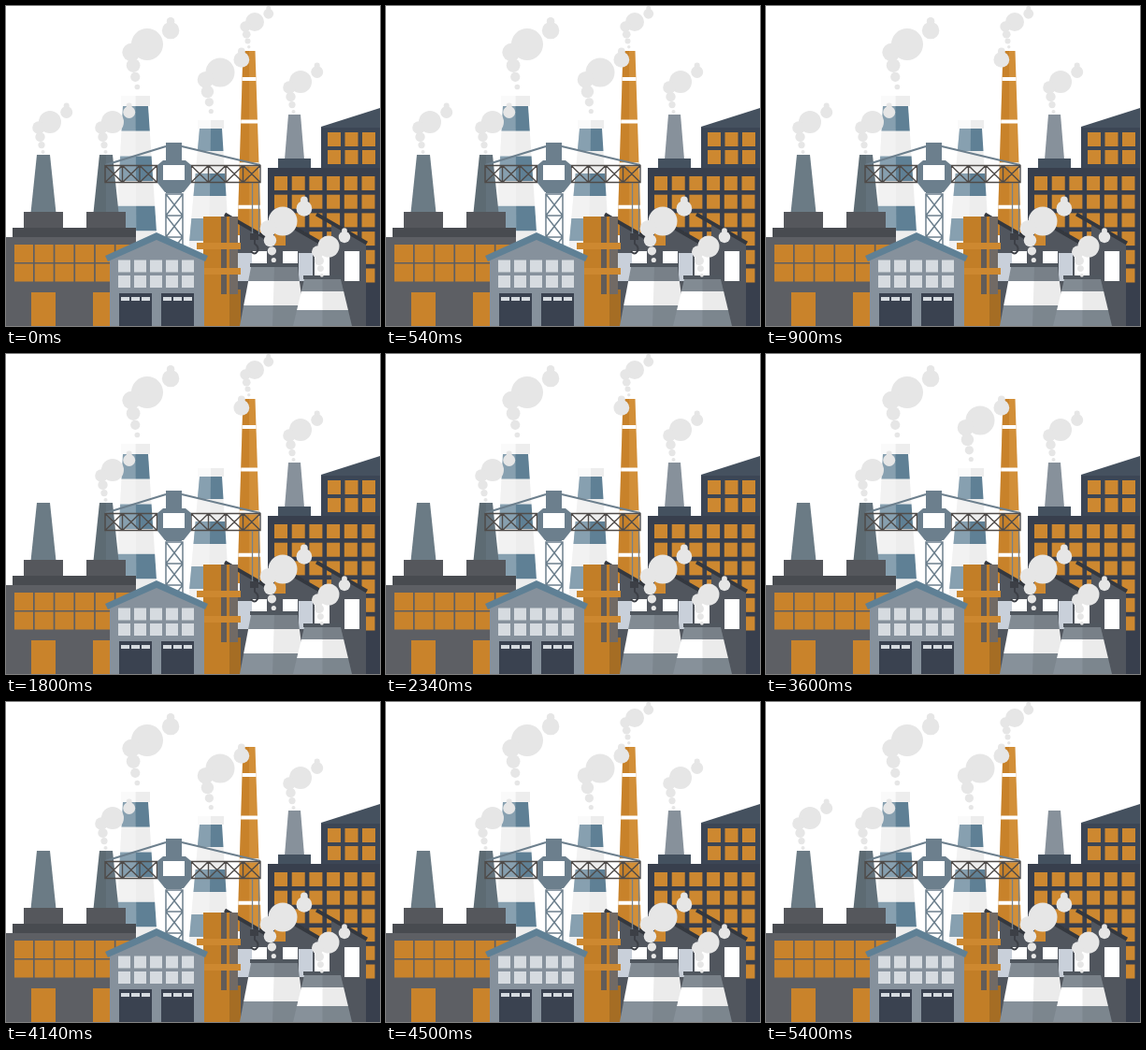
Write an HTML page that moves like this. It is 400 px wide and 342 px high and loops after 6.3 s.

```html
<!DOCTYPE html>
<html lang="en">
<head>
<meta charset="utf-8">
<title>Factory skyline</title>
<style>
html, body { margin: 0; width: 100%; height: 100%; overflow: hidden; background: #fff; }
svg { display: block; width: 100vw; height: 100vh; }
</style>
</head>
<body>
<svg id="stage" viewBox="0 0 400 342"></svg>
<script>
const stage = document.getElementById('stage');
const FLOOR = 342;
const ORANGE = '#cd8830', BLUE = '#5f8095', NAVY = '#383f4d', STEEL = '#6c7f8d', BEAM = '#4f4b49';
const WALL = '#51565e', DARK = '#34383f', PALE = '#d6dbe0';

function add(tag, attrs) {
  const el = document.createElementNS('http://www.w3.org/2000/svg', tag);
  for (const k in attrs) el.setAttribute(k, attrs[k]);
  stage.appendChild(el);
  return el;
}
// Rectangles are given by their edges.
const box = (x1, y1, x2, y2, fill) => add('rect', { x: x1, y: y1, width: x2 - x1, height: y2 - y1, fill });
const poly = (points, fill, opacity = 1) => add('polygon', { points, fill, opacity });
const line = (d, stroke, width) => add('path', { d, stroke, 'stroke-width': width, fill: 'none' });

// Rows of equal panes: first corner, counts, spacing, pane size.
function panes(x, y, cols, rows, dx, dy, w, h, fill) {
  for (let r = 0; r < rows; r++)
    for (let c = 0; c < cols; c++)
      box(x + c * dx, y + r * dy, x + c * dx + w, y + r * dy + h, fill);
}

// A tapered tower; band() paints a slice, half() tints one side.
function taper(y1, l1, r1, y2, l2, r2) {
  const mix = (a, b, y) => a + (b - a) * (y - y1) / (y2 - y1);
  const left = y => mix(l1, l2, y), right = y => mix(r1, r2, y);
  const mid = y => (left(y) + right(y)) / 2;
  const slice = (a, b, from, to, fill, opacity) =>
    poly(`${from(a)},${a} ${to(a)},${a} ${to(b)},${b} ${from(b)},${b}`, fill, opacity);
  return {
    band: (a, b, fill) => slice(a, b, left, right, fill),
    half: (side, fill, opacity) => side === 'left'
      ? slice(y1, y2, left, mid, fill, opacity)
      : slice(y1, y2, mid, right, fill, opacity)
  };
}

function rightBlocks() {
  taper(116, 302, 315, 164, 298, 319).band(116, 164, '#87919b');
  box(291, 163, 326, 175, '#44515f');
  poly('337,129 400,109 400,175 337,175', '#45515f');
  box(337, 130, 400, 175, '#3c4655');
  panes(344, 135, 3, 2, 18.5, 19, 14, 15, ORANGE);
  box(280, 173, 400, FLOOR, NAVY);
  panes(287, 182, 6, 6, 18.7, 19.7, 14, 15, ORANGE);
}

function stripedStack(top, bottom, step, cap) {
  const [y, l, r] = top, [yb, lb, rb] = bottom;
  const t = taper(y, l, r, yb, lb, rb);
  for (let i = 0, a = y; a < yb; i++, a += step)
    t.band(a, Math.min(a + step, yb), i % 2 ? '#ededed' : BLUE);
  t.half('left', '#fff', .25);
  const mid = (l + r) / 2;
  box(l - 2, cap, mid, y, '#fafafa');
  box(mid, cap, r + 2, y, '#ededed');
}

function chimney() {
  const t = taper(48, 253.5, 266.5, 245, 247.5, 273);
  t.band(48, 245, '#d28f38');
  t.half('left', '#a85c00', .25);
  for (let y = 76; y < 245; y += 45.6) t.band(y, y + 4, '#fff');
}

function leftPlant() {
  for (const [x, shade] of [[40, 0], [107, .13]]) {
    const t = taper(159, x - 7, x + 7, 221, x - 13.5, x + 13.5);
    t.band(159, 221, '#6b7b85');
    t.half('left', '#000', shade);
    t.half('right', '#000', shade / 2);
    box(x - 21, 220, x + 21, 238, '#55575c');
  }
  box(0, 247, 139, FLOOR, '#5d5f64');
  box(7, 237, 139, 247, '#484b50');
  panes(9, 255, 6, 2, 21.7, 20.5, 20, 19, '#c9832b');
  panes(27, 306, 2, 1, 66, 0, 26, 36, '#c9832b');
}

// Braced cells between two rails, across or down.
function truss(x, y, n, w, h, down) {
  let d = '';
  for (let i = 0; i < n; i++) {
    const a = x + (down ? 0 : i * w), b = y + (down ? i * h : 0);
    d += `M${a} ${b}h${w}v${h}h${-w}zl${w} ${h}M${a + w} ${b}l${-w} ${h}`;
  }
  return d;
}

function crane() {
  line('M171 150L106 170M188 150L272 170', STEEL, 2);
  line(truss(171, 201, 3, 18, 23, true), STEEL, 1.5);
  line(truss(106, 170.5, 3, 18.5, 18, false) + truss(198, 170.5, 4, 18.5, 18, false), BEAM, 1.4);
  box(171, 146, 188, 200, STEEL);
  poly('168,165 192,165 198,170 198,189 190,199 170,199 162,189 162,170', STEEL);
  box(168, 170, 191, 186, '#fff');
}

function sheds() {
  for (let i = 2; i >= 0; i--) {
    const x = 235 + 49 * i;
    poly(`${x + 15},232 ${x + 52},254 ${x + 52},${FLOOR} ${x + 15},${FLOOR}`, WALL);
    line(`M${x - 1} 222.5L${x + 53} 253.5`, DARK, 4);
  }
  box(248, 256, 385, FLOOR, WALL);
  for (const x of [248, 313]) box(x, 264, x + 15, 294, '#c9d0da');
  for (const x of [263, 296, 330, 362]) box(x, 262, x + 16, 294, '#fff');
  line('M263.5 189V244M270.5 189V244', '#74818c', 1.3);
  box(261, 243, 270, 250, '#3c3f46');
  line('M266 249V254Q271 258 269 262Q266 267 262 262', '#3c3f46', 2);
}

function coolingTower(l, r, y, lb, rb, white, base) {
  const t = taper(y, l, r, FLOOR, lb, rb);
  t.band(y, white, '#828b93');
  t.band(white, base, '#fff');
  t.band(base, FLOOR, '#87919a');
  t.half('right', '#000', .08);
  box(l - 1, y - 4, r + 1, y, '#50575f');
}

function scaffold() {
  box(211, 225, 239, FLOOR, '#c27e27');
  box(239, 303, 251, FLOOR, '#a56d24');
  box(230, 225, 236, 308, '#625c58');
  box(239, 225, 248, 308, '#716a65');
  for (const y of [253, 280]) box(204, y, 251, y + 7, ORANGE);
}

function garage() {
  poly(`111,268 161,246 212,268 212,${FLOOR} 111,${FLOOR}`, '#86919c');
  poly('161,242 216,267 213,273 161,250 109,273 106,267', BLUE);
  panes(120, 271.5, 5, 2, 17, 16.5, 13, 13, PALE);
  for (const x of [121, 166]) {
    box(x, 307, x + 35, FLOOR, '#3a4250');
    panes(x + 2, 311, 3, 1, 11, 0, 9, 4, PALE);
  }
}

// One plume: a big puff, a small one drifting off, and a tail down to the stack.
function plume(x, y, r) {
  const k = r / 12;
  const puff = (dx, dy, size) =>
    add('circle', { cx: x + dx * k, cy: y + dy * k, r: size * k, fill: '#e6e6e6' });
  const dots = [puff(17.7, -10.5, 6.5), puff(17.7, -17.5, 3), puff(0, 0, 12)];
  for (let i = 0; i < 4; i++)
    dots.push(puff(-12 + 1.5 * i, 6 + 10.5 * i - .6 * i * i, 6.8 - 1.6 * i));
  return dots;
}

rightBlocks();
stripedStack([107, 125, 152], [256, 117, 162], 26.7, 96);
stripedStack([131, 207, 231], [275, 194, 240], 24, 122);
chimney();
leftPlant();
crane();
sheds();
scaffold();
garage();
coolingTower(262, 312, 279, 250, 320, 294, 320);
coolingTower(319, 358, 292, 307, 370, 305, 325);

// Each plume is hidden from step "from" until step "to"; "keep" puffs always stay.
const PLUMES = [
  { x: 47, y: 124, r: 12, from: 2, to: 6 },
  { x: 114, y: 124, r: 12 },
  { x: 151, y: 41, r: 17 },
  { x: 229, y: 71, r: 15.5, from: 1, to: 4, keep: 2 },
  { x: 266, y: 17, r: 10, from: 3, to: 5 },
  { x: 315, y: 81, r: 12, from: 6, to: 7 },
  { x: 296, y: 230, r: 15.5 },
  { x: 345, y: 257, r: 11.5 }
];
for (const p of PLUMES) p.dots = plume(p.x, p.y, p.r);

const STEP = 900, COUNT = 7;
function draw(ms) {
  const step = Math.floor(ms / STEP) % COUNT;
  for (const { dots, from, to, keep = 0 } of PLUMES) {
    const hidden = step >= from && step < to;
    dots.forEach((dot, i) => dot.setAttribute('visibility', hidden && i >= keep ? 'hidden' : 'visible'));
  }
}

function tick() {
  draw(performance.now());
  requestAnimationFrame(tick);
}
tick();
</script>
</body>
</html>
```
